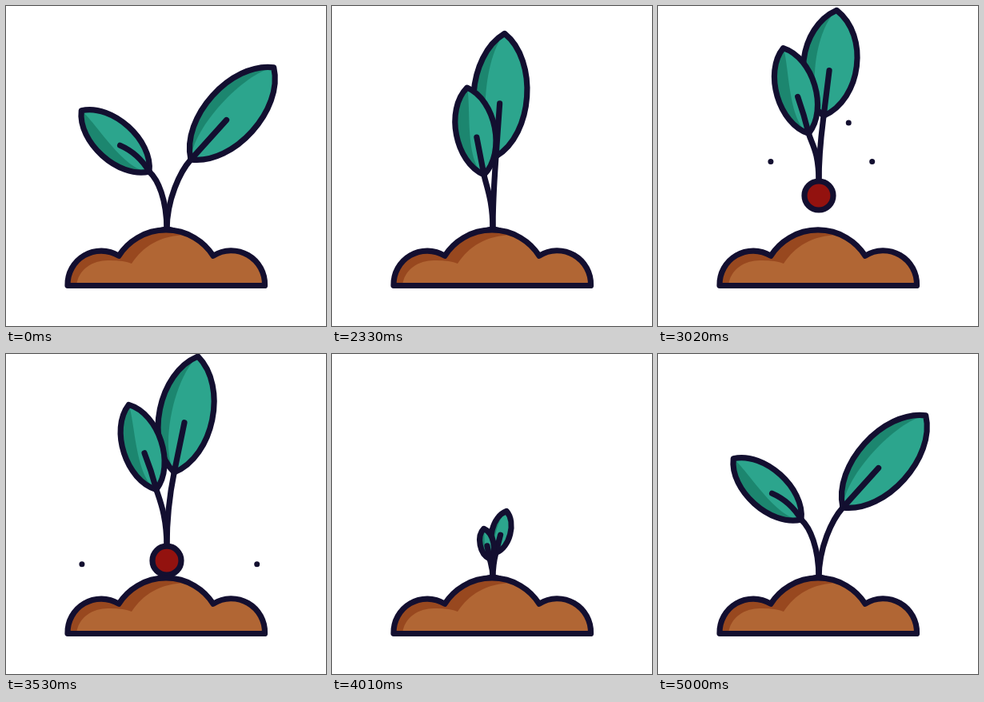
An HTML page with a canvas for the animation above (5.03 s loop, 400x400 px).

```html
<!DOCTYPE html>
<html lang="en">
<head>
<meta charset="utf-8">
<title>Sprout</title>
<style>
  html, body { margin: 0; width: 100%; height: 100%; overflow: hidden; background: #fff; }
  canvas { display: block; }
</style>
</head>
<body>
<canvas id="stage" width="400" height="400"></canvas>
<script>
const ctx = document.getElementById('stage').getContext('2d');
const LOOP = 5030, CX = 201;
const INK = '#130f30', LEAF = '#2ca58d', LEAF_DARK = '#1c866f';
const SOIL = '#b16634', SOIL_DARK = '#98481f', BULB = '#93120f';

// time, bulb y, leaf sag, scale, right openness, left openness, right leaf length, ease into this key
const KEYS = [
  [1990, 297, 0, 1, 1, 1, 155, 1],
  [2330, 297, 0, 1, 0, 0, 154, 0],
  [2530, 290, 0, 1, 0, 0, 152, 0],
  [2760, 250, 9, 1, .03, .06, 138, -2],
  [3020, 237, 9, 1, .08, .15, 133, -2],
  [3530, 258, -2, 1, .2, .19, 148, 2],
  [3660, 283, 0, 1, .2, .15, 150, 1],
  [3860, 297, 0, .03, .2, 0, 155, 1],
  [4010, 297, 0, .345, .27, 0, 155, 1],
  [4950, 297, 0, 1, 1, 1, 155, -2.2]
];

const mix = (a, b, k) => a + (b - a) * k;

// power > 0 eases in, power < 0 eases out, 0 does both
function ease(k, power) {
  if (!power) return k * k * (3 - 2 * k);
  return power > 0 ? k ** power : 1 - (1 - k) ** -power;
}

function poseAt(t) {
  const i = KEYS.findIndex(key => key[0] > t);
  if (t < 2030 || i < 0) return KEYS[0].slice(1, 7);
  const a = KEYS[i - 1], b = KEYS[i];
  const k = ease((t - a[0]) / (b[0] - a[0]), b[7]);
  return a.slice(1, 7).map((v, n) => mix(v, b[n + 1], k));
}

const mound = new Path2D('M77 349.5A42 42 0 0 1 141 312.3A70 70 0 0 1 259 312.3A42 42 0 0 1 323.5 349.5Z');
const moundLight = new Path2D('M88 350C90 328 110 317 130 318Q148 318 157 322C172 300 192 287 226 286L240 270H330V350Z');

function fillClipped(shape, dark, inner, light) {
  ctx.save();
  ctx.clip(shape);
  ctx.fillStyle = dark;
  ctx.fill(shape);
  ctx.fillStyle = light;
  ctx.fill(inner);
  ctx.restore();
  ctx.stroke(shape);
}

// Blunt lens along the x axis; the upper side may bulge unevenly from base to tip
function lens(len, width, baseBulge = .285, tipBulge = baseBulge) {
  const p = new Path2D();
  const a = .2 * len, b = .8 * len, low = .285 * width;
  p.moveTo(0, 0);
  p.bezierCurveTo(a, -baseBulge * width, b, -tipBulge * width, len, 0);
  p.bezierCurveTo(b, low, a, low, 0, 0);
  return p;
}

function drawBranch(x, y, angle, len, width, footY, s, shade, bend) {
  const rad = angle * Math.PI / 180;
  const dx = Math.sin(rad), dy = -Math.cos(rad);
  const lead = len * .13;

  ctx.beginPath();
  ctx.moveTo(CX, footY + 17);
  ctx.lineTo(CX, footY);
  ctx.bezierCurveTo(CX, footY - 38 * s, x - dx * lead, y - dy * lead, x, y);
  ctx.stroke();

  ctx.save();
  ctx.translate(x, y);
  ctx.rotate(rad - Math.PI / 2);
  fillClipped(lens(len, width), LEAF_DARK, lens(len, width, ...shade), LEAF);
  ctx.beginPath();
  ctx.moveTo(0, 0);
  ctx.quadraticCurveTo(len * .22, bend, len * .43, 0);
  ctx.stroke();
  ctx.restore();
}

function drawPlant(t) {
  const [bulbY, sag, s, right, left, rightLen] = poseAt(t);
  const footY = bulbY - 17;
  if (s > .06) {
    const px = x => CX + (x - CX) * s;
    const py = y => footY + (y + sag - 280) * s;
    drawBranch(px(mix(205, 231, right)), py(mix(188, 192, right)), mix(4, 42, right),
      rightLen * s, 156 * s, footY, s, [.16, .15], 0);
    drawBranch(px(mix(190, 179, left)), py(mix(211, 207, left)), mix(-11, -48, left),
      mix(111, 114, left) * s, 114 * s, footY, s, [.18, -.01], 8 * left * s);
  }
  ctx.beginPath();
  ctx.arc(CX, bulbY, 18, 0, 7);
  ctx.fillStyle = BULB;
  ctx.fill();
  ctx.stroke();
}

function drawCrumbs(t) {
  const u = (t - 2540) / 1000;
  ctx.fillStyle = INK;
  const pair = (offset, y) => {
    for (const side of [-1, 1]) {
      ctx.beginPath();
      ctx.arc(204.3 + side * offset, y, 3.5, 0, 7);
      ctx.fill();
    }
  };
  if (u > 0 && u < 1.12) pair(20 + 90.2 * u, 284.5 - 343 * u + 324 * u * u);
  if (u > 0 && u < .97) pair(8 + 54 * u, 146 + 139 * (u / .48 - 1) ** 2);
}

function frame(now) {
  const t = now % LOOP;
  ctx.fillStyle = '#fff';
  ctx.fillRect(0, 0, 400, 400);
  ctx.strokeStyle = INK;
  ctx.lineWidth = 7.2;
  ctx.lineCap = ctx.lineJoin = 'round';
  drawCrumbs(t);
  drawPlant(t);
  fillClipped(mound, SOIL_DARK, moundLight, SOIL);
  requestAnimationFrame(frame);
}
requestAnimationFrame(frame);
</script>
</body>
</html>
```
